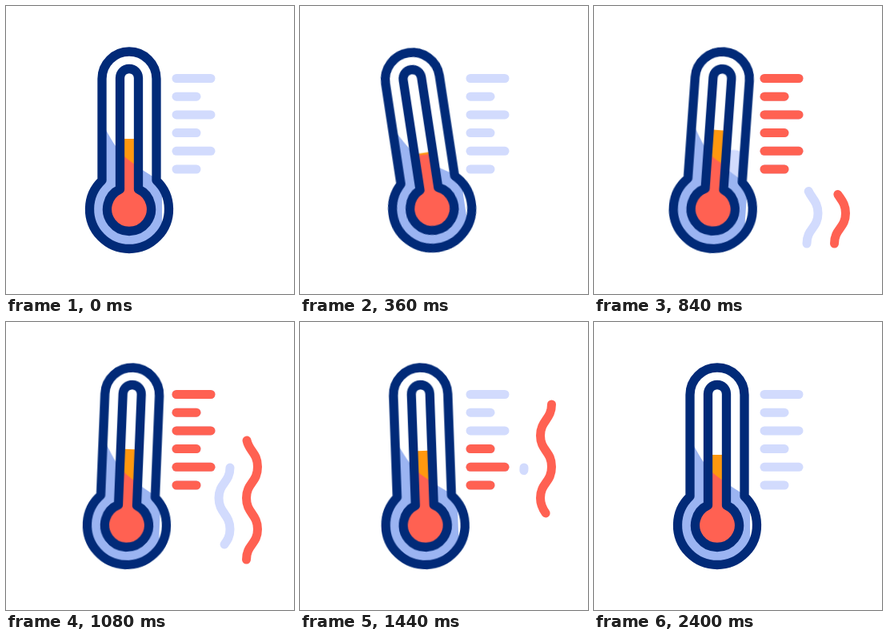
Animation, 360 px wide and 360 px high, one loop 2420 ms. Source, as an HTML page:

```html
<!DOCTYPE html>
<html lang="en">
<head>
<meta charset="utf-8">
<title>Thermometer</title>
<style>
@property --head { syntax: "<number>"; inherits: false; initial-value: 0; }
@property --tail { syntax: "<number>"; inherits: false; initial-value: 0; }

:root {
  --navy: #012a78;
  --blue: #9bb4f2;
  --pale: #d2dbfd;
  --red: #ff6152;
  --orange: #ff980f;
  --sine: cubic-bezier(.37, 0, .63, 1);
}
html, body { margin: 0; width: 100%; height: 100%; overflow: hidden; background: #fff; }
svg { display: block; width: 100vw; height: 100vh; }

.swing, .level, .warm, .slosh { animation: 2420ms var(--sine) infinite; }
.swing { transform-origin: 154px 180px; animation-name: swing; }
.level { fill: var(--orange); animation-name: level; }
.warm { fill: var(--red); transform-origin: 154px 193px; animation-name: warm; }
.slosh { fill: var(--pale); animation-name: slosh; }
.outline { fill: none; stroke: var(--navy); stroke-width: 11.3; stroke-linejoin: round; }

.line, .wave { fill: none; stroke-width: 11; stroke-linecap: round; stroke-linejoin: round; }
.wave {
  stroke-dasharray: calc(var(--head) - var(--tail)) 9;
  stroke-dashoffset: calc(-1 * var(--tail));
}
.tall { stroke: var(--red); animation: tall 2420ms var(--sine) infinite, tallShow 2420ms step-end infinite; }
.small { stroke: var(--pale); animation: small 2420ms var(--sine) infinite, smallShow 2420ms step-end infinite; }

@keyframes swing {
  0%, 72.73%, 100% { transform: rotate(0deg); }
  23.97% { transform: rotate(-12.6deg); }
  38.43% { transform: rotate(7deg); }
  52.27% { transform: rotate(-4deg); }
  68.55% { transform: rotate(.6deg); }
}
@keyframes level {
  0%, 71.07%, 100% { transform: translateY(0); }
  16.53% { transform: translateY(18px); }
  28.1% { transform: translateY(-13px); }
  44.63% { transform: translateY(-7px); }
  59.5% { transform: translateY(-5px); }
}
@keyframes warm {
  0%, 71.07%, 100% { transform: skewY(0deg); }
  15.5% { transform: translateY(-7px) skewY(-36deg); }
  28.1% { transform: translateY(-1px) skewY(-12deg); }
  44.63% { transform: skewY(0deg); }
}
@keyframes slosh {
  0%, 15.5% { transform: translateY(72px); opacity: 0; }
  20% { opacity: 1; }
  27.3% { transform: translateY(0); opacity: 1; }
  36% { opacity: 1; }
  42%, 100% { transform: translateY(72px); opacity: 0; }
}
@keyframes tall {
  0%, 21.9% { --head: 0; }
  55.37%, 100% { --head: 1; }
  0%, 46.2% { --tail: 0; }
  82.23%, 100% { --tail: 1; }
}
@keyframes tallShow {
  0%, 82.23%, 100% { opacity: 0; }
  21.9% { opacity: 1; }
}
@keyframes small {
  0%, 22.31% { --head: 0; }
  45.04%, 100% { --head: 1; }
  0%, 38.26% { --tail: 0; }
  62.11%, 100% { --tail: 1; }
}
@keyframes smallShow {
  0%, 62.11%, 100% { opacity: 0; }
  22.31% { opacity: 1; }
}
</style>
</head>
<body>
<svg viewBox="0 0 360 360">
  <defs>
    <path id="body" d="M120 218V91a34 34 0 0 1 68 0V218A49.5 49.5 0 1 1 120 218z"/>
    <path id="tube" d="M142.5 229V90a11.5 11.5 0 0 1 23 0V229A27.5 27.5 0 1 1 142.5 229z"/>
    <clipPath id="inBody"><use href="#body"/></clipPath>
    <clipPath id="inTube"><use href="#tube"/></clipPath>
  </defs>

  <g class="swing">
    <use href="#body" fill="#fff"/>
    <g clip-path="url(#inBody)">
      <path class="slosh" d="M115 145Q128 144 140 149Q154 152 166 143Q176 140 184 143Q185 165 180 183L168 205L115 215z"/>
      <path fill="var(--blue)" d="M115 136C124 152 130 167 143 183C156 197 172 205 195 221V315H95V136z"/>
    </g>
    <use href="#body" class="outline"/>
    <use href="#tube" fill="#fff"/>
    <g clip-path="url(#inTube)">
      <rect class="level" x="140" y="166" width="28" height="80"/>
      <path class="warm" d="M138 178Q147 188 154 193Q162 199 172 206V240H138z"/>
      <rect x="120" y="222" width="70" height="70" fill="var(--red)"/>
    </g>
    <use href="#tube" class="outline"/>
  </g>

  <g id="lines"></g>

  <path class="wave small" pathLength="1" d="M266 297C266 278 280 278 280 259S266 239 266 220S280 201 280 182"/>
  <path class="wave tall" pathLength="1" d="M300.5 297C300.5 278 314.5 278 314.5 259S300.5 239 300.5 220S314.5 201 314.5 181S300.5 161 300.5 142S314.5 122 314.5 103"/>
</svg>
<script>
const LOOP = 2420, COUNT = 6;
const lines = document.getElementById('lines');

function addLine(i, color) {
  const el = document.createElementNS('http://www.w3.org/2000/svg', 'path');
  el.setAttribute('class', 'line');
  el.setAttribute('d', `M213 ${90.5 + 22.7 * i}H${i % 2 ? 238 : 256}`);
  el.style.stroke = `var(--${color})`;
  lines.append(el);
  return el;
}

// Lines heat up from the bottom and cool down from the top.
for (let i = 0; i < COUNT; i++) {
  addLine(i, 'pale');
  const on = (440 + 80 * (COUNT - 1 - i)) / LOOP;
  const off = (1250 + 80 * i) / LOOP;
  addLine(i, 'red').animate([
    { opacity: 0, offset: 0, easing: 'step-end' },
    { opacity: 1, offset: on, easing: 'step-end' },
    { opacity: 0, offset: off, easing: 'step-end' },
    { opacity: 0, offset: 1 }
  ], { duration: LOOP, iterations: Infinity });
}
</script>
</body>
</html>
```
